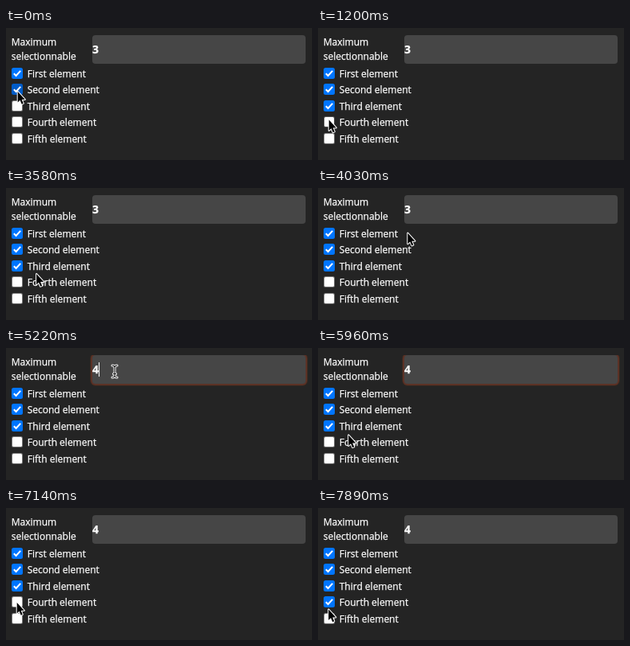
Recreate the animation shown at these times as an HTML page with a canvas. Size 383 by 166 pixels, loop 8000 ms.

```html
<!DOCTYPE html>
<html lang="en">
<head>
<meta charset="utf-8">
<title>Maximum selectionnable</title>
<style>
html, body { margin: 0; width: 100%; height: 100%; overflow: hidden; background: #242424; }
canvas { display: block; width: 383px; height: 166px; }
</style>
</head>
<body>
<canvas id="stage"></canvas>
<script>
const W = 383, H = 166, LOOP = 8000;
const STEP = 148.8; // the screen refreshes once per step
const canvas = document.getElementById('stage');
const ctx = canvas.getContext('2d');
const scale = window.devicePixelRatio || 1;
canvas.width = W * scale;
canvas.height = H * scale;

const FONT = '"Open Sans", "Noto Sans", sans-serif';
const LABELS = ['First', 'Second', 'Third', 'Fourth', 'Fifth'];
const BOX = 14;

// All times below are counted in steps
const START = { x: 14, y: 79 };
const MOVES = [
  { from: 0, to: 4, x: 14, y: 95 },
  { from: 7, to: 8, x: 13, y: 114.5 },
  { from: 22, to: 29, x: 136, y: 29.5, bow: 16 },
  { from: 36, to: 42, x: 3, y: 136 },
  { from: 42, to: 45, x: 5.5, y: 120 },
  { from: 45, to: 47, x: 13, y: 118 },
  { from: 51, to: 53, x: 12.5, y: 126.5 }
];
const PRESSES = [[4, 5], [10, 12], [17, 20], [47, 48]];
const FOCUS = 30, TYPED = 35, BLUR = 47, BLINK = 3;

const ease = p => p * p * (3 - 2 * p);

function pointerAt(n) {
  let { x, y } = START;
  for (const m of MOVES) {
    if (n < m.from) break;
    const p = ease(Math.min(1, (n - m.from) / (m.to - m.from)));
    x += (m.x - x) * p;
    y += (m.y - y) * p + (m.bow || 0) * Math.sin(Math.PI * p);
  }
  return { x, y };
}

function stateAt(n) {
  const focus = n >= FOCUS && n < BLUR;
  const sinceInput = n - (n < TYPED ? FOCUS : TYPED);
  return {
    focus,
    pointer: pointerAt(n),
    checked: [true, true, n >= PRESSES[0][1], n >= PRESSES[3][1], false],
    value: n < TYPED ? '3' : '4',
    caret: focus && Math.floor(sinceInput / BLINK) % 2 === 0,
    pressed: PRESSES.some(([a, b]) => n >= a && n < b)
  };
}

function fillBox(x, y, w, h, r, color) {
  ctx.beginPath();
  ctx.roundRect(x, y, w, h, r);
  ctx.fillStyle = color;
  ctx.fill();
}

function text(str, x, y, font) {
  ctx.font = font + ' ' + FONT;
  ctx.fillStyle = ctx.strokeStyle = '#fff';
  ctx.lineWidth = 0.25;
  ctx.fillText(str, x, y);
  ctx.strokeText(str, x, y);
}

function drawInput(s) {
  if (s.focus) {
    ctx.save();
    ctx.beginPath();
    ctx.rect(0, 9, W, H);
    ctx.clip();
    fillBox(105, 6, 273, 42, 7, '#33271f');
    fillBox(106, 7, 271, 40, 6, '#5c3226');
    ctx.restore();
  }
  fillBox(108, 9, 267, 36, 4, '#464646');
  text(s.value, 108, 32, 'bold 14px');
  if (s.caret) ctx.fillRect(116, 18, 1, 18);
}

function drawCheckbox(x, y, checked, hover, pressed) {
  if (checked) {
    fillBox(x, y, BOX, BOX, 2.5, hover ? '#005cc8' : '#0075ff');
    ctx.beginPath();
    ctx.moveTo(x + 2.8, y + 7.2);
    ctx.lineTo(x + 5.6, y + 10);
    ctx.lineTo(x + 11.2, y + 3.8);
    ctx.strokeStyle = '#fff';
    ctx.lineWidth = 2;
    ctx.stroke();
    return;
  }
  const border = !hover ? '#767676' : pressed ? '#8d8d8d' : '#4f4f4f';
  fillBox(x, y, BOX, BOX, 2.5, border);
  fillBox(x + 1, y + 1, BOX - 2, BOX - 2, 1.5, '#fff');
}

function drawRows(s) {
  const { x, y } = s.pointer;
  const left = 7;
  LABELS.forEach((name, i) => {
    const top = Math.floor(50 + i * 20.5);
    const hover = x >= left && x < left + BOX && y >= top && y < top + BOX;
    drawCheckbox(left, top, s.checked[i], hover, s.pressed);
    text(name + ' element', 26.7, top + 11.5, '12px');
  });
}

function drawArrow() {
  ctx.beginPath();
  ctx.moveTo(0.7, 1);
  ctx.lineTo(0.7, 14.6);
  ctx.lineTo(3.6, 11.8);
  ctx.lineTo(5.7, 16.8);
  ctx.lineTo(7.8, 15.9);
  ctx.lineTo(5.7, 11);
  ctx.lineTo(9.8, 11);
  ctx.closePath();
  ctx.lineJoin = 'round';
  ctx.lineWidth = 2;
  ctx.strokeStyle = '#fff';
  ctx.stroke();
  ctx.fillStyle = '#000';
  ctx.fill();
  ctx.lineJoin = 'miter';
}

function drawBeam() {
  ctx.lineCap = 'round';
  for (const [color, width] of [['#fff', 3], ['#111', 1.1]]) {
    ctx.strokeStyle = color;
    ctx.lineWidth = width;
    ctx.beginPath();
    for (const d of [-1, 1]) {
      ctx.moveTo(-3, 7.5 * d);
      ctx.quadraticCurveTo(-0.3, 7.5 * d, 0, 5.5 * d);
      ctx.quadraticCurveTo(0.3, 7.5 * d, 3, 7.5 * d);
    }
    ctx.moveTo(0, -6);
    ctx.lineTo(0, 6);
    ctx.moveTo(-1.5, 3);
    ctx.lineTo(1.5, 3);
    ctx.stroke();
  }
  ctx.lineCap = 'butt';
}

function drawPointer({ x, y }) {
  const overInput = x >= 108 && x < 375 && y >= 9 && y < 45;
  ctx.save();
  ctx.translate(x, y);
  if (overInput) drawBeam();
  else drawArrow();
  ctx.restore();
}

function draw(t) {
  const s = stateAt(Math.floor(t / STEP));
  ctx.setTransform(scale, 0, 0, scale, 0, 0);
  ctx.fillStyle = '#242424';
  ctx.fillRect(0, 0, W, H);
  text('Maximum', 6.7, 22.4, '12px');
  text('selectionnable', 6.7, 40.4, '12px');
  drawInput(s);
  drawRows(s);
  drawPointer(s.pointer);
}

const start = performance.now();
function tick() {
  draw((performance.now() - start) % LOOP);
  requestAnimationFrame(tick);
}
tick();
</script>
</body>
</html>
```
